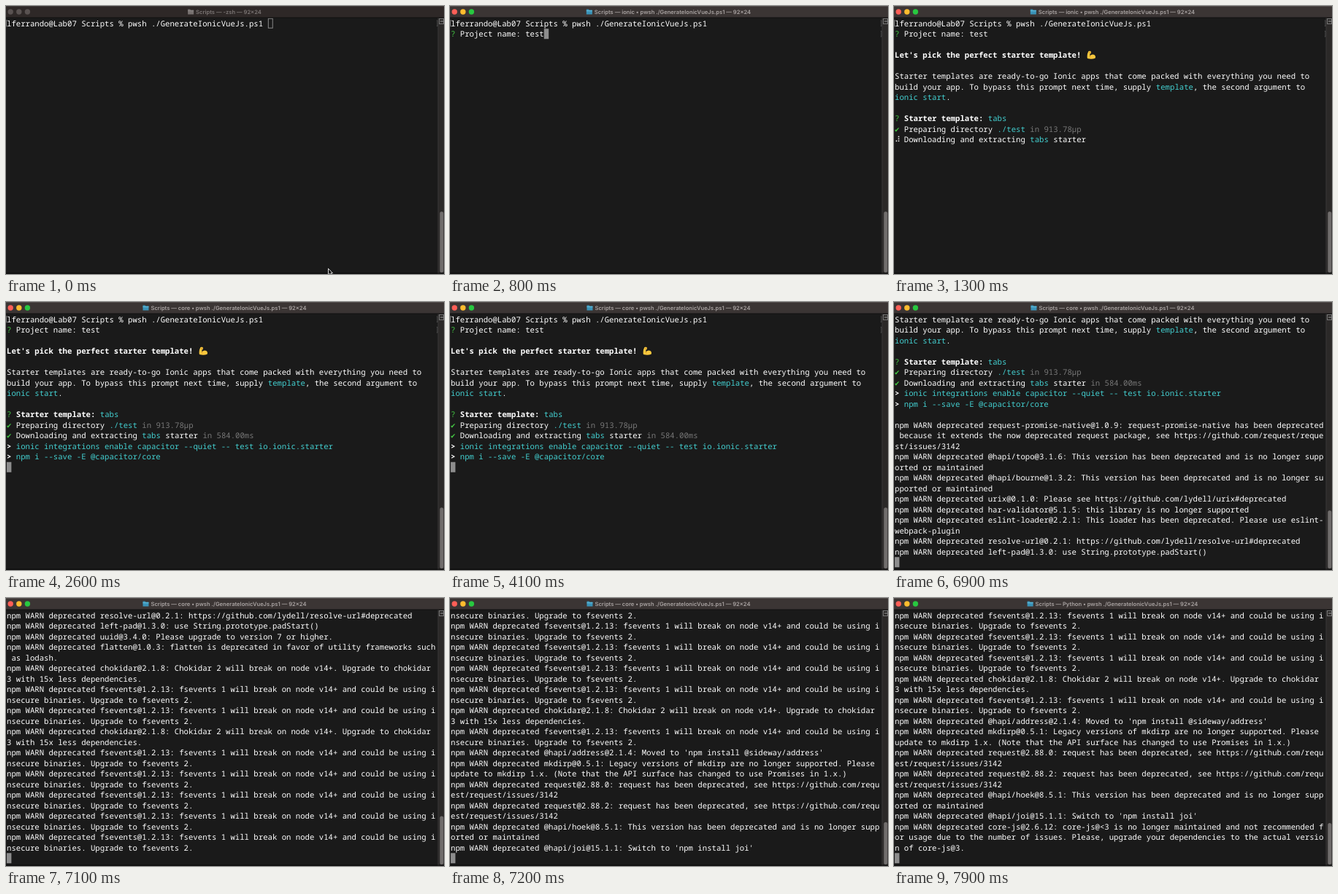
These frames come from a looping animation (600x368 px, 8000 ms). An HTML page with a canvas:

```html
<!DOCTYPE html>
<html lang="en">
<head>
<meta charset="utf-8">
<title>Terminal</title>
<style>
html, body { margin: 0; width: 100%; height: 100%; overflow: hidden; background: #1a1a1a; }
canvas { display: block; width: 600px; height: 368px; }
</style>
</head>
<body>
<canvas id="stage" width="600" height="368"></canvas>
<script>
const ctx = document.getElementById('stage').getContext('2d');
const COLS = 92, ROWS = 24, CELL = 6.39, PITCH = 14.5, LEFT = 1, TOP = 16.75;
const LOOP = 8000, STEP = 100;
const MONO = '10.65px "Noto Sans Mono", "DejaVu Sans Mono", "DejaVu Sans", monospace';
const COLORS = { g: '#43c843', c: '#43cfd0', d: '#777', b: '#fff', w: '#fff' };

// {g...} green, {c...} cyan, {d...} dim, {b...} bold
const wrap = text => text.match(new RegExp(`.{1,${COLS}}`, 'g'));
const warn = text => wrap('npm WARN deprecated ' + text);

const fsevents = 'fsevents@1.2.13: fsevents 1 will break on node v14+ and could be using insecure binaries. Upgrade to fsevents 2.';
const chokidar = 'chokidar@2.1.8: Chokidar 2 will break on node v14+. Upgrade to chokidar 3 with 15x less dependencies.';
const hapi = ': This version has been deprecated and is no longer supported or maintained';
const request = ': request has been deprecated, see https://github.com/request/request/issues/3142';

const log = [
  'lferrando@Lab07 Scripts % pwsh ./GenerateIonicVueJs.ps1 ',
  '{g?} Project name: test',
  '',
  "{bLet's pick the perfect starter template!}",
  '',
  'Starter templates are ready-to-go Ionic apps that come packed with everything you need to',
  'build your app. To bypass this prompt next time, supply {ctemplate}, the second argument to',
  '{cionic start}.',
  '',
  '{g?} {bStarter template:} {ctabs}',
  '{g✔} Preparing directory {c./test} {din 913.78µp}',
  '{g✔} Downloading and extracting {ctabs} starter {din 584.00ms}',
  '{b>} {cionic integrations enable capacitor --quiet -- test io.ionic.starter}',
  '{b>} {cnpm i --save -E @capacitor/core}',
  '',
  ...[
    'request-promise-native@1.0.9: request-promise-native has been deprecated because it extends the now deprecated request package, see https://github.com/request/request/issues/3142',
    '@hapi/topo@3.1.6' + hapi,
    '@hapi/bourne@1.3.2' + hapi,
    'urix@0.1.0: Please see https://github.com/lydell/urix#deprecated',
    'har-validator@5.1.5: this library is no longer supported',
    'eslint-loader@2.2.1: This loader has been deprecated. Please use eslint-webpack-plugin',
    'resolve-url@0.2.1: https://github.com/lydell/resolve-url#deprecated',
    'left-pad@1.3.0: use String.prototype.padStart()',
    'uuid@3.4.0: Please upgrade to version 7 or higher.',
    'flatten@1.0.3: flatten is deprecated in favor of utility frameworks such as lodash.',
    chokidar, fsevents, fsevents, chokidar, fsevents, fsevents,
    fsevents, fsevents, fsevents, fsevents, fsevents, chokidar, fsevents,
    "@hapi/address@2.1.4: Moved to 'npm install @sideway/address'",
    'mkdirp@0.5.1: Legacy versions of mkdirp are no longer supported. Please update to mkdirp 1.x. (Note that the API surface has changed to use Promises in 1.x.)',
    'request@2.88.0' + request,
    'request@2.88.2' + request,
    '@hapi/hoek@8.5.1' + hapi,
    "@hapi/joi@15.1.1: Switch to 'npm install joi'",
    'core-js@2.6.12: core-js@<3 is no longer maintained and not recommended for usage due to the number of issues. Please, upgrade your dependencies to the actual version of core-js@3.'
  ].flatMap(warn)
];

const ask = typed => ['{g?} Project name: ' + typed];
const menu = [
  '{g?} {bStarter template:} {d(Use arrow keys)}',
  '{c❯ tabs     | A starting project with a simple tabbed interface}',
  '  sidemenu | A starting project with a side menu with navigation in the content area',
  '  blank    | A blank starter project',
  '  list     | A starting project with a list'
];
const spinner = ['⠼ Downloading and extracting {ctabs} starter'];

// start time, finished log lines, unfinished lines below them
const screens = [
  [0, 0, [log[0]]], [300, 1], [400, 1, ask('')], [500, 1, ask('t')], [600, 1, ask('te')],
  [700, 1, ask('tes')], [800, 1, ask('test')], [900, 2], [1000, 9, menu], [1200, 10],
  [1300, 11, spinner], [1400, 12], [1500, 13], [1600, 14],
  [6500, 18], [6600, 22], [6700, 24], [6800, 26], [6900, 28],
  [7000, 33], [7100, 49], [7200, 67], [7600, 70]
];
const script = 'pwsh ./GenerateIonicVueJs.ps1';
const titles = [
  [0, '-zsh'], [300, script], [400, 'ionic • ' + script],
  [1600, 'core • ' + script], [7800, 'Python • ' + script]
];
const at = (list, t) => list.findLast(entry => entry[0] <= t);

function box(x, y, w, h, color) {
  ctx.fillStyle = color;
  ctx.fillRect(x, y, w, h);
}

function frame(x, y, w, h, color) {
  ctx.strokeStyle = color;
  ctx.lineWidth = 1;
  ctx.strokeRect(x, y, w, h);
}

function shape(path, x, y, fill, stroke) {
  const p = new Path2D(path);
  ctx.save();
  ctx.translate(x, y);
  if (fill) { ctx.fillStyle = fill; ctx.fill(p); }
  if (stroke) { ctx.strokeStyle = stroke; ctx.lineWidth = 1; ctx.stroke(p); }
  ctx.restore();
}

// Draws one marked-up line and returns its length in cells.
function drawLine(line, row) {
  const y = TOP + row * PITCH + 10.9;
  let col = 0;
  for (const [part, tag, inner] of line.matchAll(/\{(\w)(.*?)\}|[^{]+/g)) {
    const text = tag ? inner : part;
    ctx.font = (tag === 'b' ? '700 ' : '500 ') + MONO;
    ctx.fillStyle = COLORS[tag || 'w'];
    // Symbols may come from a wider font, so they stay in their own cell.
    for (const run of text.match(/[✔⠼❯]|[^✔⠼❯]+/g)) {
      ctx.fillText(run, LEFT + col * CELL, y);
      col += run.length;
    }
  }
  return col;
}

function drawArm(row) {
  const y = TOP + row * PITCH + 1;
  shape('M2.5 .8 Q5 -.2 6 1.6 L5.8 4 L4.3 4.2 L4.5 7 Q7.5 4 10.3 5.8 Q13 8 11.5 10.5 Q7 12.5 1 10.8 Q-.2 6 2.5 .8Z',
    264, y, '#f9c73d');
  shape('M4.5 7 Q4 8.3 5.3 9 M3.2 2.6 L5.6 2.4', 264, y, null, '#c98a22');
}

function drawTitle(t, active) {
  box(0, 0, 600, 16, active ? '#3b3534' : '#2e2827');
  box(0, 0, 600, 1, active ? '#544e4d' : '#403a39');
  box(0, 15.5, 600, 1, '#111');
  ['#ff5f57', '#febc2e', '#28c840'].forEach((color, i) => {
    ctx.fillStyle = active ? color : '#595251';
    ctx.beginPath();
    ctx.arc(6.2 + i * 11.6, 8, 3.7, 0, 7);
    ctx.fill();
  });
  const title = `Scripts — ${at(titles, t)[1]} — 92×24`;
  ctx.font = '600 7.6px Inter, "Liberation Sans", sans-serif';
  const x = 299.5 - (ctx.measureText(title).width + 11) / 2;
  shape('M0 1 h3 l1 1 h4 v6 h-8Z', x, 3.5, active ? '#3a93b8' : '#777170');
  shape('M0 3.2 h8', x, 3.5, null, active ? '#65bfdc' : '#8b8584');
  ctx.fillStyle = active ? '#aaa4a3' : '#7c7675';
  ctx.fillText(title, x + 11, 10.8);
}

function drawScrollbar(offset) {
  box(592, 16, 8, 352, '#2b2928');
  box(591.5, 16, 1, 352, '#3b3938');
  frame(593.5, 17.5, 6, 7, '#777');
  box(595, 20.5, 4, 1, '#999');
  const h = 349 * ROWS / (100 + offset);
  ctx.fillStyle = '#706d6c';
  ctx.beginPath();
  ctx.roundRect(594.3, 366 - h, 5, h, 2.5);
  ctx.fill();
}

function drawPointer(t) {
  if (t < 200) shape('M0 0 V8.5 L2 6.8 L3.5 9.5 L4.8 8.8 L3.6 6.3 H6Z', 441.5, 360.5, '#111', '#ddd');
  if (t >= 5800 && t < 6500) {
    const e = 1 - (1 - Math.min(1, (t - 5800) / 300)) ** 2;
    shape('M-2 -5 Q0 -5 0 -3.5 Q0 -5 2 -5 M0 -4 V4 M-2 5 Q0 5 0 3.5 Q0 5 2 5 M-1.5 1.5 H1.5',
      166 - 14 * e, 317 - 99 * e, null, '#bbb');
  }
}

function draw(t) {
  const [, done, tail = []] = at(screens, t);
  const lines = [...log.slice(0, done), ...tail];
  const hidden = tail === menu || tail === spinner;
  const active = t >= 100;
  const last = tail.length ? lines.length - 1 : lines.length;
  const offset = Math.max(0, last - ROWS + 1);

  box(0, 0, 600, 368, '#1a1a1a');
  let end = 0;
  lines.slice(offset).forEach((line, row) => { end = drawLine(line, row); });
  if (!offset && lines.length > 3) drawArm(3);
  if (!offset) {
    shape('M1.5 .5 H.5 V9 H1.5', 0, 19, null, '#777');
    for (let i = 0; i < Math.min(2, lines.length); i++)
      shape('M0 .5 H1 V8 H0', 590, 19.5 + i * PITCH, null, '#555');
  }

  if (!hidden) {
    const x = LEFT + (tail.length ? end : 0) * CELL;
    const y = TOP + (last - offset) * PITCH;
    if (active) box(x, y, CELL, PITCH - .5, '#8d8d8d');
    else frame(x + .5, y + .5, CELL - .5, PITCH - 1.5, '#8a8a8a');
  }
  drawScrollbar(offset);
  drawTitle(t, active);
  box(0, 366.5, 600, 1, '#0b0b0b');
  drawPointer(t);
}

ctx.textRendering = 'geometricPrecision';

function tick() {
  draw(Math.floor(performance.now() % LOOP / STEP) * STEP);
  requestAnimationFrame(tick);
}
tick();
</script>
</body>
</html>
```
